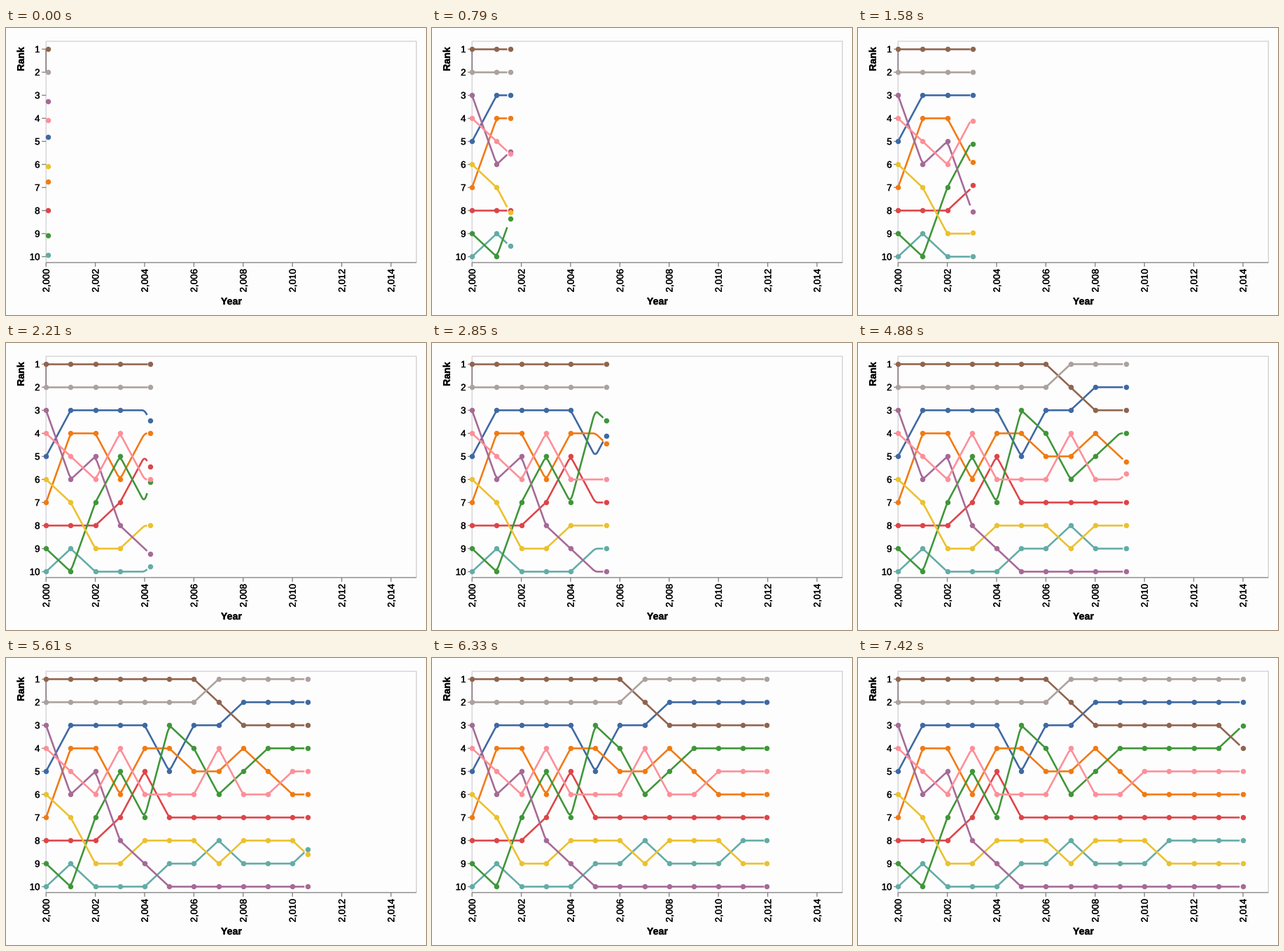
A matplotlib script that plays this animation: 600x411 px, repeating every 7.45 s.

```python
import numpy as np
import matplotlib.pyplot as plt
from matplotlib.animation import FuncAnimation
from matplotlib.patheffects import withStroke

W, H, DPI = 600, 411, 100
PX = 72 / DPI
LOOP, STEP = 7450, 25
LEFT, TOP, RIGHT, BOTTOM = 57.2, 19, 586.3, 335.9
DX, Y1, DY = 35.2, 30.3, 33.02
LAST = 14
LAG = 0.12  # years the line trails behind the moving dot

plt.rcParams["font.family"] = "Liberation Sans"
plt.rcParams["text.hinting"] = "none"

COLORS = {
    "B": "#3e69a2", "O": "#f17a12", "R": "#dd4548", "T": "#63aca6",
    "E": "#3f9639", "Y": "#ebc12f", "P": "#a56a96", "K": "#fd8f98",
    "N": "#8f654f", "G": "#aca19e",
}
# opening order, then who moves to which rank in each following year
START = "NGPKBYORET"
MOVES = ("B3 O5 P6 T9|K6 E7 Y9|K4 E5 P8|O4 R5 Y8|E3 B5 R7 P10|B3|"
         "G1 K4 E6 T8|N3 K6 Y8|E4|K5|T8|||E3")
YEARS = np.arange(LAST + 1)


def rank_history():
    order = list(START)
    history = {name: [order.index(name) + 1] for name in COLORS}
    for moves in MOVES.split("|"):
        for name, *rank in moves.split():
            order.remove(name)
            order.insert(int("".join(rank)) - 1, name)
        for name in COLORS:
            history[name].append(order.index(name) + 1)
    return history


def px(year):
    return LEFT + DX * np.asarray(year)


def py(rank):
    return Y1 + DY * (np.asarray(rank) - 1)


def rounded(t, ranks, reach=0.09):
    """Rank at t with the corners of the polyline softened."""
    half = np.minimum(reach, np.minimum(t, LAST - t))
    offsets = np.linspace(-1, 1, 9)[:, None] * half
    return np.interp(t + offsets, YEARS, ranks).mean(axis=0)


fig = plt.figure(figsize=(W / DPI, H / DPI), dpi=DPI, facecolor="#fefdfe")
ax = fig.add_axes([0, 0, 1, 1])
ax.set_xlim(0, W)
ax.set_ylim(H, 0)
ax.axis("off")


def rule(xs, ys, color="#808080", z=1):
    ax.plot(xs, ys, color=color, lw=1.3 * PX, zorder=z, snap=False,
            solid_capstyle="butt")


def label(x, y, s, size=13.4, **kw):
    ax.text(x, y, s, fontsize=size * PX, color="black", va="baseline",
            rotation_mode="anchor",
            path_effects=[withStroke(linewidth=0.3 * PX, foreground="black")],
            **kw)


rule([LEFT, LEFT, RIGHT, RIGHT], [BOTTOM, TOP, TOP, BOTTOM], "#d0d0d3")
rule([LEFT, RIGHT], [BOTTOM, BOTTOM])
for rank in range(1, 11):
    y = py(rank)
    rule([LEFT - 6, LEFT], [y, y])
    label(48.5, y + 4.7, str(rank), ha="right")
for year in range(0, LAST + 1, 2):
    x = px(year)
    rule([x, x], [BOTTOM, BOTTOM + 6])
    label(x + 4.7, 345, f"{2000 + year:,}", ha="right", rotation=90)
label(322, 396, "Year", 14.2, ha="center", weight="bold")
label(25.8, 44.5, "Rank", 14.2, ha="center", weight="bold", rotation=90)
rule([LEFT, LEFT], [py(1), py(2)], "#6e6068", 2)

series = []
history = rank_history()
for i, (name, color) in enumerate(COLORS.items()):
    line, = ax.plot([], [], color=color, lw=2.6 * PX, zorder=3 + i / 20,
                    solid_capstyle="butt", solid_joinstyle="round")
    dots, = ax.plot([], [], "o", color=color, ms=7.5 * PX, mew=0,
                    zorder=4 + i / 20, snap=False)
    series.append((line, dots, history[name]))


def draw(i):
    now = min(0.09 + i * STEP * 1.878e-3, LAST)
    end = max(now - LAG, 0)
    path = np.append(np.arange(0, end, 0.03), end)
    # a year's dot appears once the moving dot is well past it
    dot_t = np.append(YEARS[YEARS < np.floor(now + 0.5)], now)
    for line, dots, ranks in series:
        line.set_data(px(path), py(rounded(path, ranks)))
        dots.set_data(px(dot_t), py(np.interp(dot_t, YEARS, ranks)))
    return [artist for s in series for artist in s[:2]]


anim = FuncAnimation(fig, draw, frames=LOOP // STEP, interval=STEP,
                     repeat=True, repeat_delay=0)
plt.show()
```
